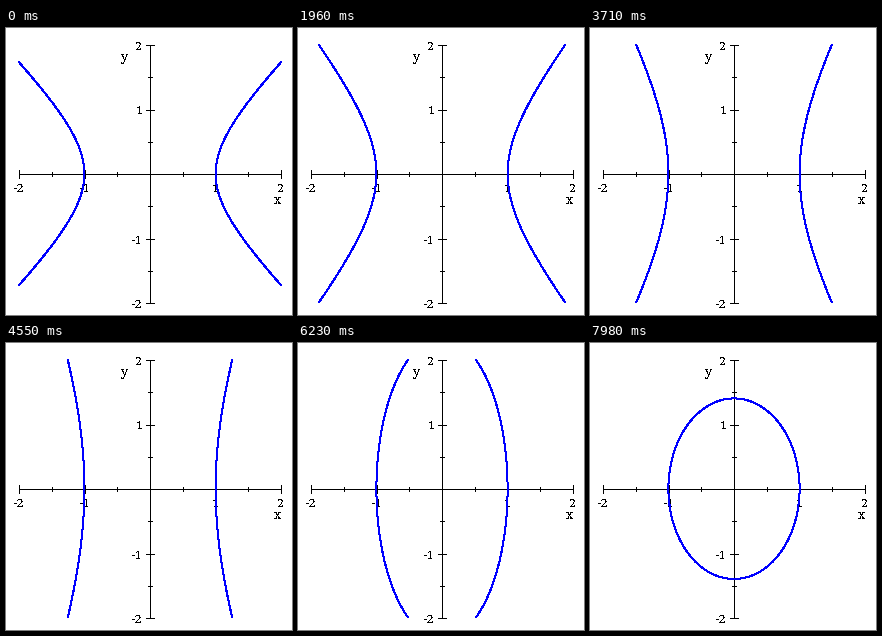
Write a matplotlib script that moves like this. It is 286 px wide and 287 px high and loops after 8 s.

```python
import numpy as np
import matplotlib.pyplot as plt
from matplotlib.animation import FuncAnimation

WIDTH, HEIGHT, DPI = 286, 287, 64
PX = 72 / DPI                      # points per pixel
CX, CY = 144, 146                  # origin of the plot
SX, SY = 65.5, 64.5                # pixels per unit
LIMIT = 2
LOOP_MS, FRAME_MS = 8000, 20

plt.rcParams["font.family"] = "DejaVu Serif"
plt.rcParams["text.antialiased"] = False

fig = plt.figure(figsize=(WIDTH / DPI, HEIGHT / DPI), dpi=DPI, facecolor="white")
ax = fig.add_axes([0, 0, 1, 1])
ax.set_xlim(0, WIDTH)
ax.set_ylim(HEIGHT, 0)
ax.axis("off")


def segment(x0, y0, x1, y1):
    ax.plot([x0, x1], [y0, y1], color="black", lw=PX, antialiased=False,
            solid_capstyle="projecting", zorder=2)


def label(x, y, text, size=11, ha="center"):
    ax.text(x, y, text, fontsize=size * PX, ha=ha, va="baseline", zorder=3)


def draw_axes():
    segment(CX - LIMIT * SX, CY, CX + LIMIT * SX, CY)
    segment(CX, CY - LIMIT * SY, CX, CY + LIMIT * SY)
    for half in range(-4, 5):
        if half == 0:
            continue
        value = half / 2
        x, y = CX + value * SX, CY - value * SY
        reach = 2 if half % 2 else 4
        segment(x, CY - reach, x, CY + reach)
        segment(CX - reach, y, CX + reach, y)
        if half % 2 == 0:
            text = str(half // 2)
            label(x, 164.5, text)
            label(136.5, y + 5, text, ha="right")
    label(118.5, 32.5, "y", 13)
    label(272, 175.5, "x", 13)


def step_at(ms):
    """Steps last 210 ms; every sixteenth one is held 70 ms longer."""
    cycle, rest = divmod(ms, 3430)
    return 16 * cycle + max(0, (rest - 70) // 210)


def conic(a):
    """Both branches of x^2 + a y^2 = 1 inside the plot window."""
    reach = LIMIT
    if a < 0:
        reach = min(LIMIT, np.sqrt((1 - LIMIT ** 2) / a))
    elif a > 0:
        reach = min(LIMIT, 1 / np.sqrt(a))
    y = reach * np.sin(np.linspace(-np.pi / 2, np.pi / 2, 121))
    x = np.sqrt(np.maximum(0, 1 - a * y ** 2))
    xs = np.concatenate([-x, [np.nan], x])
    ys = np.concatenate([y, [np.nan], y])
    return CX + (SX + 0.1) * xs, CY - 0.3 - SY * ys


draw_axes()
# An aliased stroke fills every pixel it touches, so 1 px shows as about 2.
curve, = ax.plot([], [], color="#0000ff", lw=PX, antialiased=False, snap=False,
                 solid_capstyle="butt", zorder=4)


def update(frame):
    step = step_at(frame * FRAME_MS + FRAME_MS // 2)
    curve.set_data(*conic(-1 + 2 * step / 49))
    return curve,


anim = FuncAnimation(fig, update, frames=LOOP_MS // FRAME_MS, interval=FRAME_MS,
                     repeat=True, repeat_delay=0)
plt.show()
```
